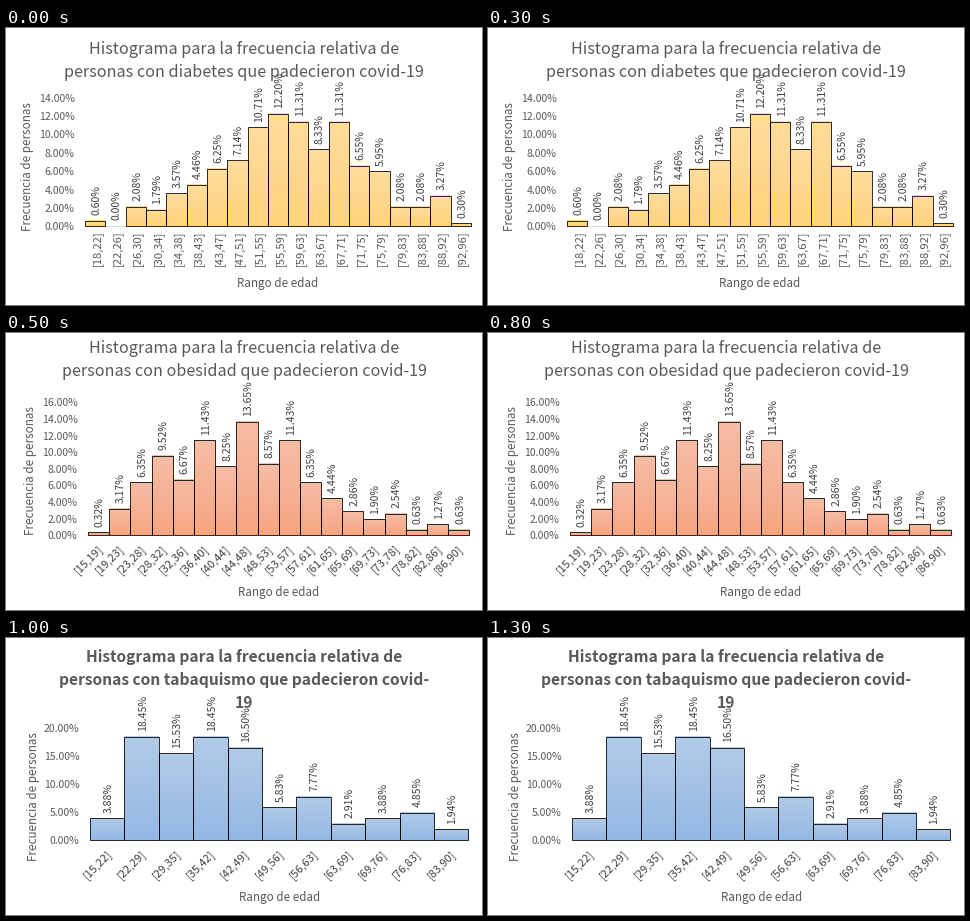
Animation, 476 px wide and 277 px high, one loop 1.5 s. Source, as a matplotlib script:

```python
import numpy as np
import matplotlib.pyplot as plt
from matplotlib.animation import ArtistAnimation
from matplotlib.colors import to_rgb
from matplotlib.patches import Rectangle

W, H, DPI = 476, 277, 64
PX = 72 / DPI  # points per pixel
GREY, DARK = "#595959", "#404040"
TICK, RANGE, AXIS = 10.47, 11.2, 11.63
TITLE = {"normal": 16.2, "bold": 15.6}
CAP = 0.733  # cap height of the font, in em

plt.rcParams["font.family"] = "Noto Sans CJK JP"
fig = plt.figure(figsize=(W / DPI, H / DPI), dpi=DPI, facecolor="white")
ax = fig.add_axes([0, 0, 1, 1])
ax.axis("off")


def text(x, y, s, size, ha="center", rot=0, color=GREY, weight="normal"):
    return ax.text(x, y, s, fontsize=size * PX, ha=ha, va="baseline", rotation=rot,
                   rotation_mode="anchor", color=color, weight=weight)


def bar(x, y, w, h, shades):
    """Outlined bar with a vertical gradient from the first shade to the last."""
    stops = np.array([to_rgb(c) for c in shades])
    t = np.linspace(0, 1, 64)
    pos = np.linspace(0, 1, len(stops))
    ramp = np.stack([np.interp(t, pos, ch) for ch in stops.T], axis=-1)
    fill = ax.imshow(ramp[:, None, :], extent=(x, x + w, y + h, y),
                     aspect="auto", zorder=1)
    edge = ax.add_patch(Rectangle((x, y), w, h, fill=False, ec="black",
                                  lw=0.8 * PX, zorder=2))
    return [fill, edge]


def chart(topic, title_y, counts, first, step, shades, box, peak, tick_step,
          ylabel_y, slanted=True, weight="normal"):
    """One histogram: bins start at age `first`, each `step` years wide."""
    left, top, right, base = box
    scale = (base - top) / peak
    mid_x = (left + right) / 2
    parts = []

    title = f"Histograma para la frecuencia relativa de\npersonas con {topic}"
    for i, line in enumerate(title.split("\n")):
        parts.append(text(W / 2, title_y + 22.8 * i, line, TITLE[weight], weight=weight))

    for v in range(0, peak + 1, tick_step):
        parts.append(text(left - 10.5, base - v * scale + CAP * TICK / 2 + 0.5,
                          f"{v:.2f}%", TICK, "right"))
    parts += ax.plot([left, right], [base, base], color="#d9d9d9", lw=PX, zorder=0)

    w = (right - left) / len(counts)
    for i, n in enumerate(counts):
        share = 100 * n / sum(counts)
        x, h = left + i * w, share * scale
        mid = x + w / 2 + 0.5
        if n:
            parts += bar(x, base - h, w, h, shades)
        parts.append(text(mid + CAP * TICK / 2, base - h - 5.5, f"{share:.2f}%",
                          TICK, "left", 90, DARK))
        name = f"[{round(first + i * step)},{round(first + (i + 1) * step)}]"
        if slanted:
            parts.append(text(mid + 4, base + 13.5, name, RANGE, "right", 45, DARK))
        else:
            parts.append(text(mid + CAP * RANGE / 2, base + 4.5, name, RANGE, "right", 90))

    parts.append(text(left - 53.5, ylabel_y, "Frecuencia de personas", AXIS, rot=90))
    parts.append(text(mid_x, base + 60.5, "Rango de edad", AXIS))
    return parts


# Patients counted in each age bin; percentages follow from the totals.
diabetes = chart(
    "diabetes que padecieron covid-19", 26,
    [2, 0, 7, 6, 12, 15, 21, 24, 36, 41, 38, 28, 38, 22, 20, 7, 7, 11, 1],
    18, 4.09, ["#ffdd9c", "#ffd78e", "#ffd479"],
    (79, 69.2, 465, 198), 14, 2, 138.5, slanted=False)

obesity = chart(
    "obesidad que padecieron covid-19", 20,
    [1, 10, 20, 30, 21, 36, 26, 43, 27, 36, 20, 14, 9, 6, 8, 2, 4, 2],
    15, 4.17, ["#f7bda4", "#f5b195", "#f8a581"],
    (82, 69, 463.4, 202), 16, 2, 138)

smoking = chart(
    "tabaquismo que padecieron covid-\n19", 24,
    [4, 19, 16, 19, 17, 6, 8, 3, 4, 5, 2],
    15, 6.8, ["#b1cbe9", "#a3c1e5", "#92b9e4"],
    (84, 90, 462.4, 202), 20, 5, 158.5, weight="bold")

ax.set_xlim(0, W)
ax.set_ylim(H, 0)

anim = ArtistAnimation(fig, [diabetes, obesity, smoking], interval=500, repeat=True)
plt.show()
```
